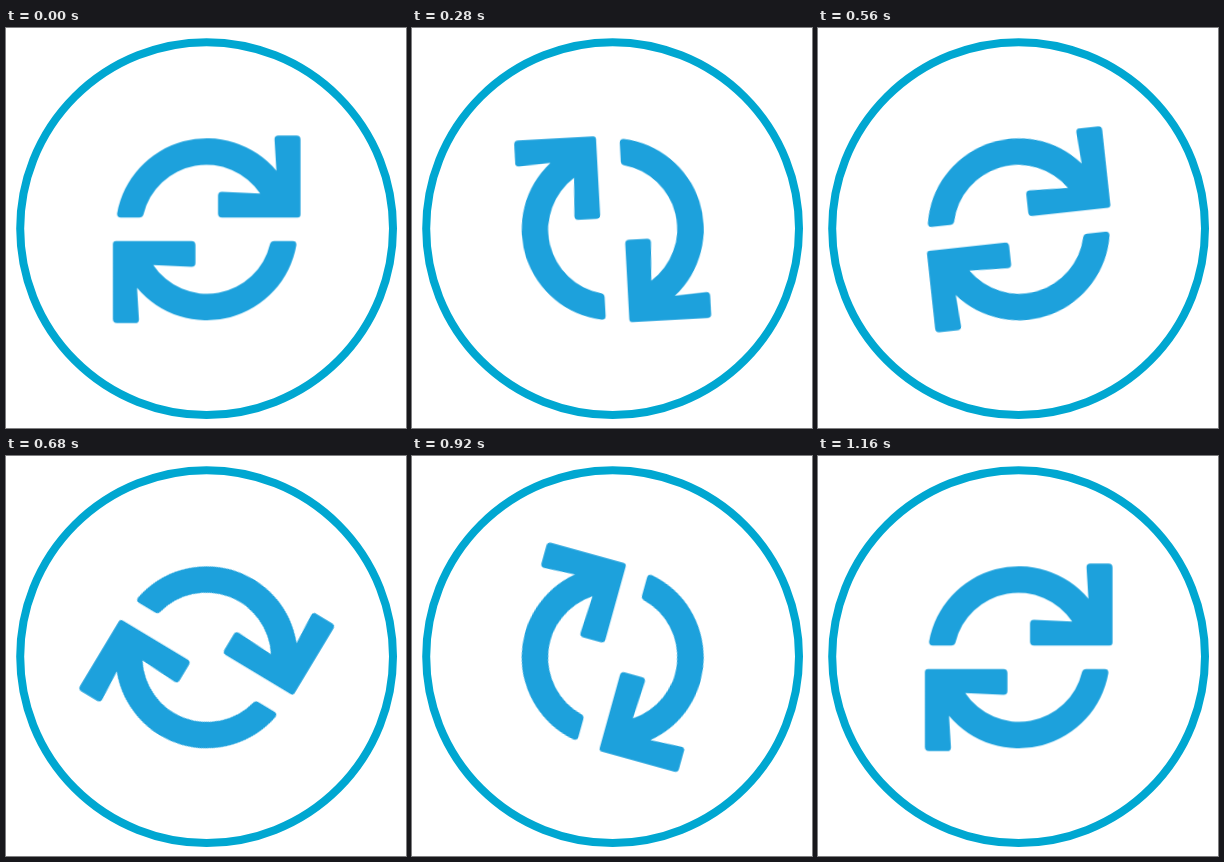
These frames come from a looping animation (400 by 400 pixels, 1.2 s). An HTML page without scripts:

```html
<!DOCTYPE html>
<html lang="en">
<head>
<meta charset="utf-8">
<title>Refresh</title>
<style>
  html, body { margin: 0; width: 100%; height: 100%; overflow: hidden; background: #fff; }
  svg { display: block; width: 100%; height: 100%; }
  .ring { fill: none; stroke: #00a7d1; stroke-width: 8; }
  .arrows { fill: #1da1dc; }
  /* 29 equal steps per turn; the upright pose shows twice at the seam */
  .spin { animation: spin 1200ms steps(30, jump-none) -3ms infinite; }
  @keyframes spin {
    from { transform: rotate(0deg); }
    to { transform: rotate(360deg); }
  }
</style>
</head>
<body>
<svg viewBox="0 0 400 400">
  <circle class="ring" cx="200.6" cy="200.6" r="186.4"/>
  <g class="arrows" transform="translate(200.7 201.3)">
    <g class="spin">
      <path id="arrow" d="M-86-11.8H-67.5Q-64.2-11.8-63.3-14.8
        A64.7 64.7 0 0 1 53.5-35.7L15.3-37.6Q11.3-37.7 11.3-33.8
        V-15.8q0 4 4 4H90.8q3 0 3-3V-89.8q0-4-4-4H71.6q-4 0-3.8 4
        L69.7-58.5A91 91 0 0 0-89.6-16Q-90-11.8-86-11.8Z"/>
      <use href="#arrow" transform="rotate(180)"/>
    </g>
  </g>
</svg>
</body>
</html>
```
